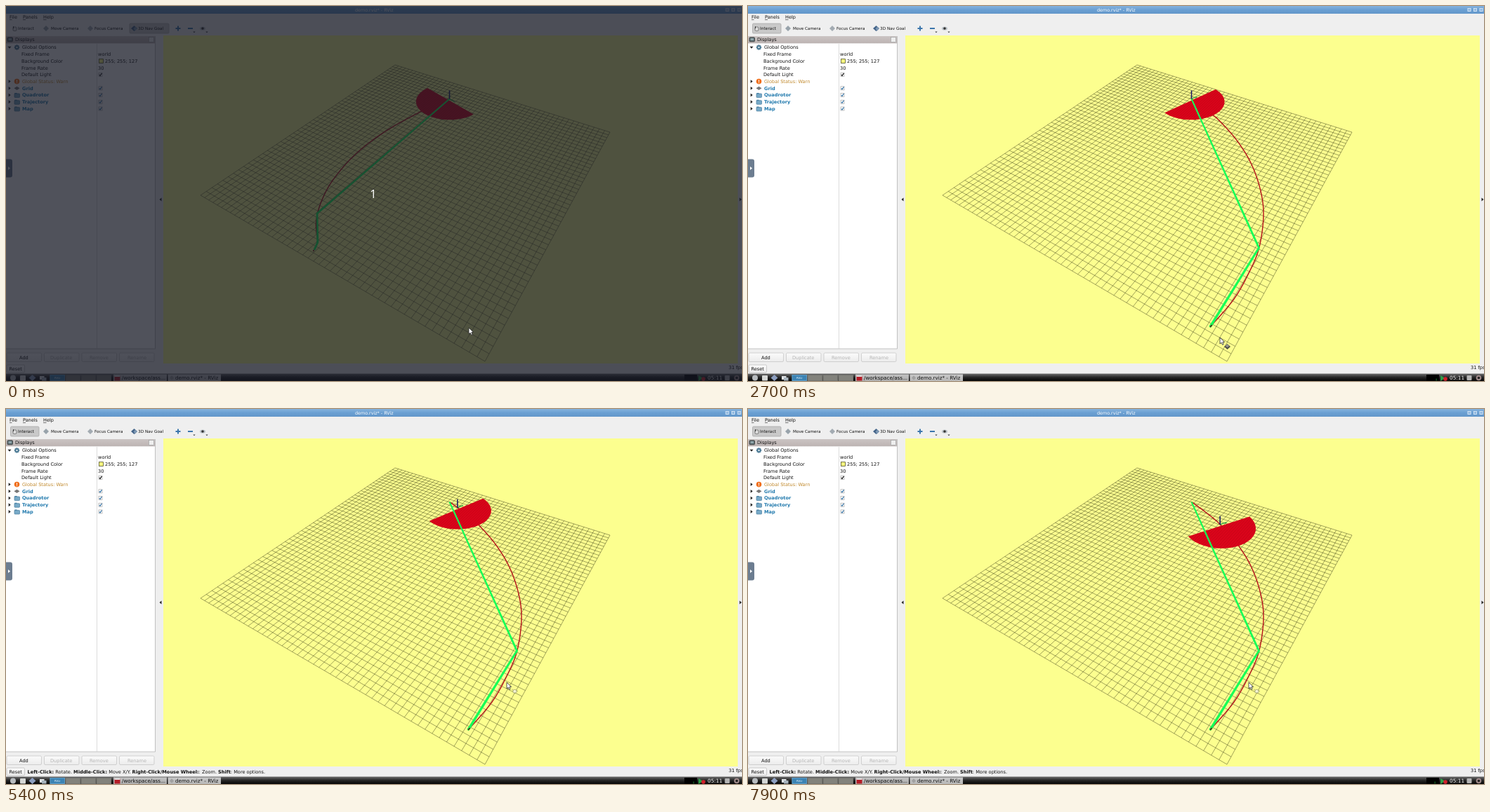
Recreate the animation shown at these times as an HTML page with a canvas. Size 1048 by 535 pixels, loop 8000 ms.

```html
<!DOCTYPE html>
<html lang="en">
<head>
<meta charset="utf-8">
<style>
html, body { margin: 0; width: 100%; height: 100%; overflow: hidden; background: #efefef; }
canvas { display: block; }
</style>
</head>
<body>
<canvas id="stage" width="1048" height="535"></canvas>
<script>
const ctx = document.getElementById('stage').getContext('2d');
const LOOP = 8000, TAU = Math.PI * 2;
const SANS = '"DejaVu Sans", sans-serif';

// ---------- drawing helpers ----------
function rect(x, y, w, h, fill, stroke) {
  if (fill) { ctx.fillStyle = fill; ctx.fillRect(x, y, w, h); }
  if (stroke) {
    ctx.strokeStyle = stroke; ctx.lineWidth = 0.7;
    ctx.strokeRect(x + 0.5, y + 0.5, w - 1, h - 1);
  }
}
function shade(y, h, ...colors) {
  const g = ctx.createLinearGradient(0, y, 0, y + h);
  colors.forEach((c, i) => g.addColorStop(i / (colors.length - 1), c));
  return g;
}
function text(str, x, y, size = 6.6, color = '#111', weight = '') {
  ctx.font = `${weight} ${size}px ${SANS}`;
  ctx.fillStyle = color;
  ctx.fillText(str, x, y + size * 0.36);
  return ctx.measureText(str).width;
}
function trace(points) {
  ctx.beginPath();
  points.forEach(([x, y]) => ctx.lineTo(x, y));
}
function poly(points, fill) { trace(points); ctx.closePath(); ctx.fillStyle = fill; ctx.fill(); }
function line(points, color, width) {
  trace(points);
  ctx.strokeStyle = color; ctx.lineWidth = width; ctx.stroke();
}
function dot(x, y, r, fill) {
  ctx.beginPath(); ctx.arc(x, y, r, 0, TAU); ctx.fillStyle = fill; ctx.fill();
}
function diamond(x, y, rx, ry, fill) { poly([[x - rx, y], [x, y - ry], [x + rx, y], [x, y + ry]], fill); }
function roundBox(x, y, w, h, r, fill, stroke) {
  ctx.beginPath(); ctx.roundRect(x, y, w, h, r);
  ctx.fillStyle = fill; ctx.fill();
  if (stroke) { ctx.strokeStyle = stroke; ctx.lineWidth = 0.7; ctx.stroke(); }
}

// ---------- ground plane: unit square <-> screen ----------
const BACK = [554, 84], RIGHT = [860, 180], FRONT = [682, 507], LEFT = [277, 270];
const CELLS = 50;
const H = (() => {
  const [x0, y0] = BACK, [x1, y1] = RIGHT, [x2, y2] = FRONT, [x3, y3] = LEFT;
  const dx1 = x1 - x2, dx2 = x3 - x2, sx = x0 - x1 + x2 - x3;
  const dy1 = y1 - y2, dy2 = y3 - y2, sy = y0 - y1 + y2 - y3;
  const det = dx1 * dy2 - dx2 * dy1;
  const g = (sx * dy2 - dx2 * sy) / det, h = (dx1 * sy - sx * dy1) / det;
  return { a: x1 - x0 + g * x1, b: x3 - x0 + h * x3, c: x0,
           d: y1 - y0 + g * y1, e: y3 - y0 + h * y3, f: y0, g, h };
})();
function project(u, v) {
  const w = H.g * u + H.h * v + 1;
  return [(H.a * u + H.b * v + H.c) / w, (H.d * u + H.e * v + H.f) / w];
}
function unproject(x, y) {
  const a = H.a - x * H.g, b = H.b - x * H.h, d = H.d - y * H.g, e = H.e - y * H.h;
  const p = x - H.c, q = y - H.f, det = a * e - b * d;
  return [(p * e - b * q) / det, (a * q - d * p) / det];
}

// ---------- trajectories ----------
function spline(pts, steps = 16) {
  const out = [];
  const at = i => pts[Math.max(0, Math.min(pts.length - 1, i))];
  for (let i = 0; i < pts.length - 1; i++) {
    const [p, q, r, s] = [at(i - 1), at(i), at(i + 1), at(i + 2)];
    for (let k = 0; k < steps; k++) {
      const t = k / steps;
      out.push([0, 1].map(n => q[n] + t / 2 * (r[n] - p[n] +
        t * (2 * p[n] - 5 * q[n] + 4 * r[n] - s[n] + t * (3 * (q[n] - r[n]) + s[n] - p[n])))));
    }
  }
  out.push(at(pts.length));
  return out;
}
const START = [631.5, 132.5];
const oldRoute = {
  curve: spline([START, [592, 150], [540, 179], [497, 212], [465, 249], [449, 279], [442, 304],
                 [442, 322], [443.5, 336], [437.5, 350]]),
  path: [START, [443, 296], [443.8, 337], [439.5, 347]],
};
const newRoute = {
  curve: spline([START, [652, 147.5], [672, 164.5], [697, 193], [717, 226], [730, 264], [734, 300],
                 [728, 344], [715, 377], [692, 418], [658, 458]]),
  path: [START, [727.5, 345], [658.5, 457]],
};
function along(points, dist) {
  for (let i = 1; i < points.length; i++) {
    const [ax, ay] = points[i - 1], [bx, by] = points[i];
    const len = Math.hypot(bx - ax, by - ay);
    if (dist <= len) return [ax + (bx - ax) * dist / len, ay + (by - ay) * dist / len];
    dist -= len;
  }
  return points[points.length - 1];
}
// Segments nearer the viewer are wider.
function ribbon(points, color) {
  const half = y => 1 + (y - 130) * 0.0022;
  for (let i = 1; i < points.length; i++) {
    const [ax, ay] = points[i - 1], [bx, by] = points[i];
    const len = Math.hypot(bx - ax, by - ay), nx = (ay - by) / len, ny = (bx - ax) / len;
    const p = half(ay), q = half(by);
    poly([[ax + nx * p, ay + ny * p], [bx + nx * q, by + ny * q],
          [bx - nx * q, by - ny * q], [ax - nx * p, ay - ny * p]], color);
    dot(bx, by, q, color);
  }
}

// ---------- drone ----------
function dronePose(t) {
  const moved = Math.max(0, t - 2700) / 1000;
  const dist = 1.92 * moved * moved;
  const turn = Math.min(1, Math.max(0, (t - 1800) / 900));
  return { at: along(newRoute.curve, dist), yaw: (105 - 87 * turn + dist * 0.235) * Math.PI / 180 };
}
function drawScan({ at: [x, y], yaw }) {
  const R = 0.137, [u, v] = unproject(x - 0.8 + 0.9 * Math.sin(yaw), y + 2.5);
  const arc = [];
  for (let i = 0; i <= 48; i++) {
    const a = yaw + Math.PI * (i / 48 - 0.5);
    arc.push(project(u + R * Math.cos(a), v + R * Math.sin(a)));
  }
  poly(arc, '#e3041c');
  ctx.save();
  trace(arc); ctx.clip();
  for (let k = -15; k <= 15; k++) {
    const o = k * R / 15;
    line([project(u + o, v - R), project(u + o, v + R)], 'rgba(90,0,10,.28)', 0.5);
    line([project(u - R, v + o), project(u + R, v + o)], 'rgba(90,0,10,.28)', 0.5);
  }
  ctx.restore();
}
function drawAxes({ at: [x, y], yaw }) {
  const [u, v] = unproject(x, y), side = yaw - Math.PI / 2;
  line([[x, y], project(u + 0.03 * Math.cos(side), v + 0.03 * Math.sin(side))], '#1c9a3c', 1.2);
  line([[x, y], [x, y - 12]], '#1d1d66', 1.6);
}

function drawView(t) {
  rect(224, 42, 818, 468, '#fcff8f');
  ctx.save();
  ctx.beginPath(); ctx.rect(224, 42, 818, 468); ctx.clip();
  for (let i = 0; i <= CELLS; i++) {
    const k = i / CELLS;
    line([project(k, 0), project(k, 1)], 'rgba(45,45,15,.8)', 0.55);
    line([project(0, k), project(1, k)], 'rgba(45,45,15,.8)', 0.55);
  }
  const route = t < 1700 ? oldRoute : newRoute, pose = dronePose(t);
  line(route.curve, '#b5101a', 1.4);
  drawScan(pose);
  ribbon(route.path, '#16ff57');
  drawAxes(pose);
  line(route.curve.slice(-3), '#5a2412', 1.6);
  ctx.restore();
}

// ---------- window ----------
function drawBars() {
  rect(0, 0, 1048, 535, '#efefef');
  rect(0, 0, 1048, 11, shade(0, 11, '#84b2de', '#6a9fd2', '#6397ca'));
  text('demo.rviz* - RViz', 497, 5.6, 6.4, '#fff');
  [1027, 1035.5, 1044].forEach(x => rect(x - 2.5, 3, 5, 5, '#8fb8e0', '#e8f1fa'));
  [['File', 5, 3.5], ['Panels', 24, 4], ['Help', 53, 4.5]].forEach(([label, x, w]) => {
    text(label, x, 16, 6.5);
    line([[x, 19.6], [x + w, 19.6]], '#222', 0.6);
  });
}
function drawTools(navActive) {
  if (navActive) roundBox(176, 25, 56, 14, 1.5, '#c9c9c9', '#a2a2a2');
  else roundBox(6.5, 25, 40.5, 14, 1.5, '#c9c9c9', '#a2a2a2');
  roundBox(10, 30, 5, 5.5, 1.5, '#dcdcdc', '#555');
  line([[10.5, 29], [10.5, 32]], '#333', 1);
  diamond(57, 32, 4, 4, '#98a3ab');
  diamond(120, 32, 4, 4, '#a3abb2');
  diamond(182.5, 32, 4.5, 4, '#45658a');
  diamond(184, 32.5, 2.4, 3, '#7f9ab5');
  text('Interact', 17, 32, 5.9);
  text('Move Camera', 64, 32, 5.7);
  text('Focus Camera', 126, 32, 5.7);
  text('3D Nav Goal', 188, 32, 5.75);
  line([[241.5, 32], [248.5, 32]], '#3c76ac', 2);
  line([[245, 28.5], [245, 35.5]], '#3c76ac', 2);
  line([[259, 32], [266, 32]], '#3c76ac', 2);
  ctx.beginPath(); ctx.ellipse(280, 32, 4, 2.6, 0, 0, TAU); ctx.fillStyle = '#bcc3c9'; ctx.fill();
  dot(280, 32, 1.8, '#333');
  [268, 286].forEach(x => poly([[x - 1.6, 36.5], [x + 1.6, 36.5], [x, 38.2]], '#333'));
}
function check(x, y, color) {
  rect(x - 3, y - 3, 6, 6, '#fff', '#a8a8a8');
  line([[x - 1.7, y], [x - 0.5, y + 1.6], [x + 2, y - 2]], color, 1.1);
}
function folder(y) {
  roundBox(12, y - 3, 4, 2.5, 0.8, '#4a88ae');
  roundBox(12, y - 2, 7.5, 5.5, 0.8, '#78aac8', '#4a7d9e');
}
function drawPanel() {
  rect(0, 43, 212, 10.5, shade(43, 10, '#cbc4c3', '#bdb4b3'));
  roundBox(2, 44.8, 7.5, 6, 1, '#56676b', '#333');
  rect(3.5, 46, 4.5, 3, '#8fa5aa');
  text('Displays', 13, 48);
  rect(203, 44, 8, 8, '#eee', '#999');
  rect(0, 53.5, 212, 435.5, '#fff');
  line([[0, 489], [212.5, 489], [212.5, 43]], '#b5b5b5', 0.8);
  line([[129.5, 54], [129.5, 489]], '#d4d4d4', 0.8);

  const row = i => 59 + i * 9.72;
  poly([[2.5, row(0) - 1.2], [7.5, row(0) - 1.2], [5, row(0) + 1.7]], '#222');
  for (let i = 5; i < 10; i++) poly([[3.7, row(i) - 2.4], [6.7, row(i)], [3.7, row(i) + 2.4]], '#222');
  for (let k = 0; k < 8; k++) dot(15.5 + 3 * Math.cos(k * TAU / 8), row(0) + 3 * Math.sin(k * TAU / 8), 0.9, '#4e7c96');
  dot(15.5, row(0), 3, '#4e7c96');
  dot(15.5, row(0), 1.1, '#fff');
  dot(15.5, row(5), 3.8, '#f0701c');
  line([[15.5, row(5) - 2.2], [15.5, row(5) + 0.7]], '#fff', 1);
  dot(15.5, row(5) + 2, 0.6, '#fff');
  diamond(15.5, row(6), 4, 2.6, '#777');
  [7, 8, 9].forEach(i => folder(row(i)));

  text('Global Options', 23, row(0));
  [['Fixed Frame', 'world'], ['Background Color', ''], ['Frame Rate', '30'], ['Default Light', '']]
    .forEach(([name, value], i) => {
      text(name, 22, row(i + 1));
      text(value, 131, row(i + 1));
    });
  rect(132, row(2) - 3.2, 7, 6.6, '#ffff7f', '#333');
  text('255; 255; 127', 141, row(2));
  check(134.5, row(4), '#111');
  text('Global Status: Warn', 23, row(5), 6.6, '#c0882b');
  ['Grid', 'Quadrotor', 'Trajectory', 'Map'].forEach((name, i) => {
    text(name, 23, row(6 + i), 6.6, '#2079ad', 'bold');
    check(134.5, row(6 + i), '#2d6fa5');
  });

  [['Add', 19, 1, '#111'], ['Duplicate', 63, 54.5, '#b5b5b5'], ['Remove', 119, 108, '#b5b5b5'],
   ['Rename', 173, 161.5, '#b5b5b5']].forEach(([label, tx, x, color]) => {
    roundBox(x, 495, 49.5, 12.5, 1.5, shade(495, 12, '#fbfbfb', '#ececec'), '#c2c2c2');
    text(label, tx, 501.3, 6.6, color);
  });
}
function drawStatus(hint) {
  roundBox(1, 512, 25.5, 11, 1.5, shade(512, 11, '#fbfbfb', '#ececec'), '#b8b8b8');
  text('Reset', 4.5, 517.6);
  text('31 fps', 1029, 515.8);
  if (!hint) return;
  let x = 30.5;
  [['Left-Click:', ' Rotate. '], ['Middle-Click:', ' Move X/Y. '],
   ['Right-Click/Mouse Wheel:', ': Zoom. '], ['Shift', ': More options.']].forEach(([key, action]) => {
    x += text(key, x, 517.3, 6.6, '#111', 'bold');
    x += text(action, x, 517.3);
  });
}
function drawEdges() {
  poly([[221.5, 273.5], [221.5, 278.5], [218.5, 276]], '#222');
  poly([[1044.5, 273.5], [1044.5, 278.5], [1047.5, 276]], '#222');
  roundBox(-4, 218.5, 13, 26, 3, '#6c7d90');
  poly([[3, 229], [3, 234], [6, 231.5]], '#fff');
}
function drawTaskbar(t) {
  rect(0, 524.5, 1048, 10.5, shade(524.5, 10.5, '#6d6d6d', '#262626', '#050505'));
  dot(10, 530.5, 4, '#b8bcbf');
  roundBox(20, 527, 8, 7.5, 1, '#d6d8d6');
  diamond(37.5, 530.5, 5, 4.5, '#8d9fc0');
  rect(48, 528, 6.5, 5, '#dfe3e6');
  rect(51, 530, 6.5, 4.5, '#a8b4be');
  for (let i = 0; i < 4; i++) {
    rect(62.5 + i * 22, 526, 21.5, 9, i ? '#82827c' : '#3b83b4', i ? '#6c6c68' : '#6fa9cf');
  }
  text('RViz', 69, 530.5, 4, '#e8f2fa');
  rect(153, 525.5, 76, 9.5, shade(525, 10, '#c4c4c4', '#adadad'));
  rect(154.5, 527, 8, 7.5, '#b51d28');
  rect(154.5, 527, 8, 2, '#ddd');
  text('/workspace/ass...', 165, 530.6, 7.18, '#111');
  rect(230.5, 525.5, 75.5, 9.5, shade(525, 10, '#c9c9c9', '#b8b8b8'));
  diamond(236, 530.5, 3, 3.2, '#a0a0a0');
  text('demo.rviz* - RViz', 241, 530.6, 7.18, '#111');
  rect(966, 526, 18, 9, '#000');
  if (t >= 1700) rect(980 - (t - 1700) / 2600, 531.5, 1, 3, '#1c7a2c');
  poly([[986, 527], [993, 531], [986, 535]], '#2c9c48');
  dot(993, 532, 2.8, '#d3202b');
  text('05:11', 999, 530.6, 7.3, '#fff');
  roundBox(1023.5, 527, 7, 7, 1, '#b4b4b4');
  dot(1040.5, 530.5, 3.8, '#a08a8a');
  dot(1040.5, 530.5, 1.8, '#222');
}

// ---------- pointer ----------
function pointerAt(t) {
  if (t < 700) return [659, 459];
  if (t < 1000) return [[677, 455], [690, 461], [685, 473]][Math.floor((t - 700) / 100)];
  if (t < 1500) return [671.5, 472.5];
  const k = Math.min(1, Math.max(0, (t - 3800) / 500)), ease = k * k * (3 - 2 * k);
  return [672 + 41 * ease, 473 - 83 * ease];
}
function drawPointer(t) {
  const [x, y] = pointerAt(t);
  const shape = [[0, 0], [0, 9], [2.1, 7.2], [3.6, 10.4], [5.2, 9.6], [3.8, 6.6], [6.6, 6.4]]
    .map(([dx, dy]) => [x + dx, y + dy]);
  poly(shape, '#fff');
  ctx.closePath();
  ctx.strokeStyle = '#222'; ctx.lineWidth = 0.8; ctx.stroke();
  if (t < 500) return;
  if (t < 3900) {
    diamond(x + 10.5, y + 13, 4.5, 4, '#4f4f46');
    diamond(x + 10.5, y + 12, 2.8, 2.2, '#96968e');
  } else {
    roundBox(x + 9, y + 10.5, 5, 4.5, 1.5, 'rgba(250,250,225,.8)', 'rgba(110,110,80,.7)');
    line([[x + 7, y + 9.5], [x + 9.5, y + 11.5]], 'rgba(110,110,80,.7)', 0.7);
    line([[x + 13.5, y + 12], [x + 16, y + 12.5]], 'rgba(110,110,80,.7)', 0.7);
  }
}

function draw(t) {
  drawBars();
  drawTools(t < 1700);
  drawPanel();
  drawView(t);
  drawStatus(t >= 3900);
  drawEdges();
  drawTaskbar(t);
  if (t < 500) {
    rect(0, 0, 1048, 535, 'rgba(22,25,36,.75)');
    ctx.font = '17px "Open Sans", sans-serif';
    ctx.fillStyle = '#fff';
    ctx.fillText('1', 518, 273.5);
  }
  drawPointer(t);
}

let began = null;
function tick(now) {
  if (began === null) began = now;
  draw(Math.floor(((now - began) % LOOP) / 100) * 100);
  requestAnimationFrame(tick);
}
draw(0);
requestAnimationFrame(tick);
</script>
</body>
</html>
```
